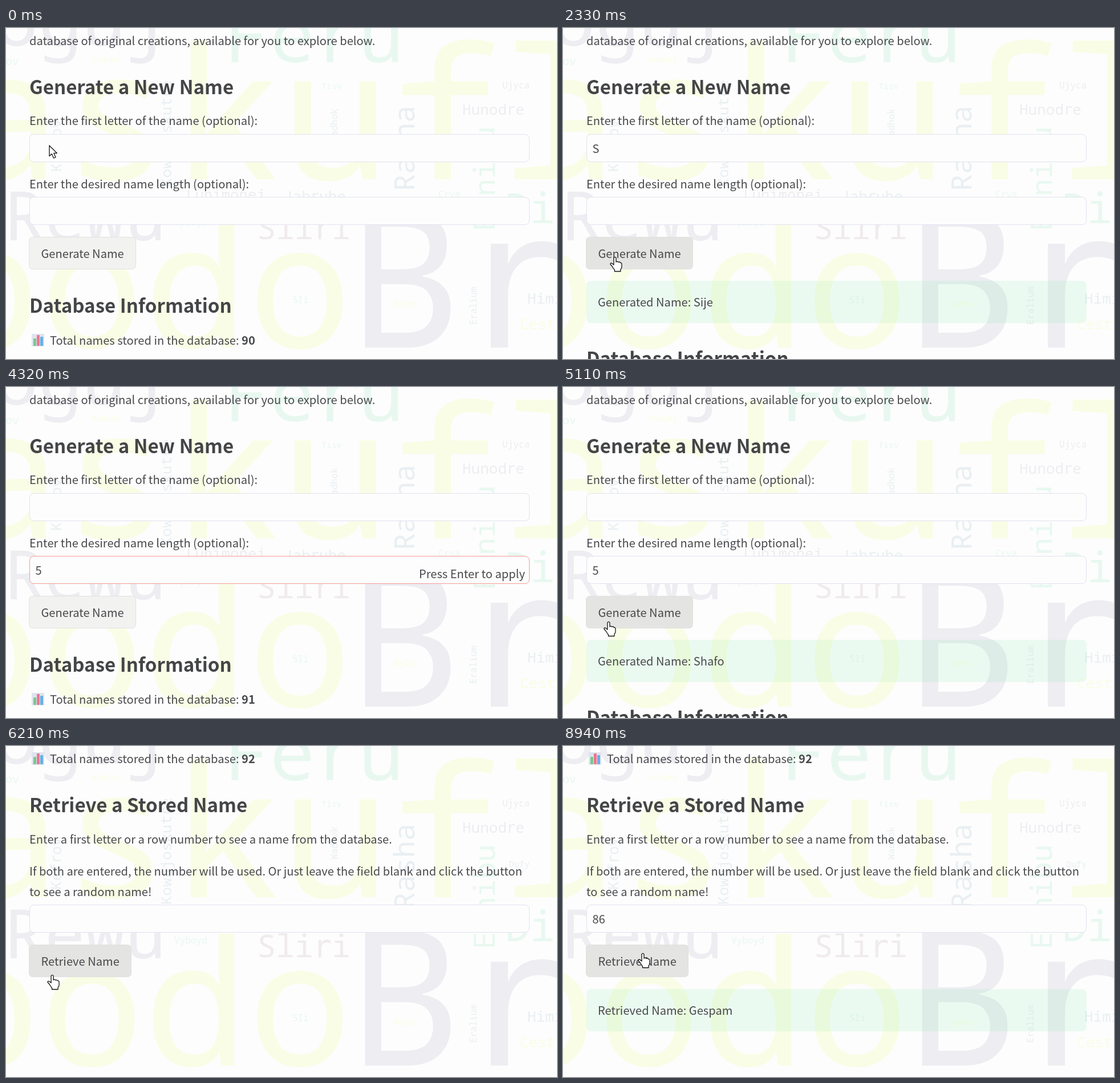
These frames come from a looping animation (966x580 px, 8980 ms). An HTML page:

```html
<!DOCTYPE html>
<html lang="en">
<head>
<meta charset="utf-8">
<title>Name generator</title>
<style>
  html, body { margin: 0; width: 100%; height: 100%; overflow: hidden; background: #fdfdfd; }
  svg { display: block; width: 966px; height: 580px; }
  text { font: 20.12px "Noto Sans CJK JP", "Noto Sans CJK SC", "Noto Sans CJK", "Open Sans", sans-serif; fill: #48494c; white-space: pre; }
  .head { font-size: 33.1px; font-weight: 700; fill: #444547; }
  .bold { font-weight: 700; }
  #cloud text { font-family: "Noto Sans Mono", "DejaVu Sans Mono", monospace; }
  #cloud tspan { font-family: "DejaVu Sans Mono", monospace; }
  .field { fill: #fdfdfd; stroke: #e2e3f0; }
  .field.focus { stroke: #f39c96; }
  .button { fill: #f2f2f0; stroke: #e2e2df; }
  .button.hover { fill: #e4e4e2; stroke: #e1e1df; }
  .success { fill: rgba(50, 215, 120, .085); }
</style>
</head>
<body>
<svg viewBox="0 0 966 580">
  <g id="cloud"></g>
  <g id="upper"></g>
  <g id="lower"></g>
  <g id="cursor" stroke="#111" stroke-width="1.3" stroke-linejoin="round" fill="#fff">
    <path id="arrow" d="M0 0V18.5L4.3 14.6L7.6 22L11 20.5L7.8 13.3H13.3Z"/>
    <path id="hand" d="M-2 1.8Q0 -1 2 1.8V9Q4.500 7 6 9.500Q8.500 8 9.700 10.500Q12 10 12 13V18Q12 20 10 22V25.500H-.5V23Q-3 20 -4.500 17L-8 13Q-8 10 -5 11.500L-2 14Z"/>
  </g>
</svg>
<script>
const LOOP = 8980, BOX = 93;
const $ = id => document.getElementById(id);

function add(parent, tag, attrs, content = '') {
  const el = document.createElementNS('http://www.w3.org/2000/svg', tag);
  for (const k in attrs) el.setAttribute(k, attrs[k]);
  el.textContent = content;
  return parent.appendChild(el);
}
const label = (g, s, y, x = 41, cls = '') => add(g, 'text', { x, y, class: cls }, s);
const heading = (g, s, y) => label(g, s, y, 41, 'head');
const show = (el, on) => el.setAttribute('visibility', on ? 'visible' : 'hidden');
const place = (el, x, y) => el.setAttribute('transform', `translate(${x} ${y})`);

// Word cloud: text, x, baseline, size, colour, upright
const tint = { y: '#f9fde5', g: '#ededf2', m: '#e8f8f0', b: '#e9eff2', p: '#f0ebed' };
const words = [
  ['oguj', -20, 31, 128, 'g'], ['Feru', 383, 60, 132, 'm'],
  ['askufl', -94, 265, 320, 'y'], ['Rewu', -3, 372, 118, 'g'],
  ['bodo', -123, 560, 304, 'y'], ['Br', 598, 560, 333, 'g'],
  ['Sliri', 440, 370, 55, 'p'], ['Dij', 875, 342, 73, 'm'],
  ['Hunodre', 800, 152, 26, 'g'], ['Lunimonej', 316, 301, 25.700, 'g'],
  ['Jabruhe', 487, 304, 26, 'b'], ['Himi', 914, 483, 26, 'b'],
  ['Cest', 901, 528, 26, 'y'], ['ov', -1, 65, 20, 'm'],
  ['Xodumi', 150, 60, 14, 'y'], ['Tisv', 553, 107, 15, 'm'],
  ['Ujyca', 870, 106, 16, 'g'], ['Crva', 758, 297, 16, 'm'],
  ['Dufy', 882, 212, 15, 'b'], ['Vyboyd', 295, 346, 16, 'm'],
  ['SIi', 502, 482, 16, 'm'], ['Hybo', 680, 489, 16, 'y'],
  ['Rasha', 716, 286, 50, 'b', 1], ['Esnibu', 857, 356, 51, 'm', 1],
  ['Kowajoskutre', 290, 278, 26, 'b', 1], ['Kefrov', 97, 252, 25.700, 'b', 1],
  ['Wadhok', 581, 199, 16, 'b', 1], ['Eralium', 825, 520, 16, 'b', 1]
];
for (const [s, x, y, size, c, up] of words) {
  const word = add($('cloud'), 'text', {
    transform: `translate(${x} ${y})` + (up ? ' rotate(-90)' : ''),
    style: `font-size:${size}px;fill:${tint[c]}`
  });
  // The r has no foot, unlike the other letters' font
  for (const part of s.split(/(r)/))
    if (part === 'r') add(word, 'tspan', { dx: '-.02em' }, part);
    else word.append(part);
}

function field(g, y) {
  const rect = add(g, 'rect', { x: 41.5, y: y + .5, width: 876, height: 48, rx: 7.5, class: 'field' });
  const value = label(g, '', y + 32.5, 51.5);
  const hint = label(g, 'Press Enter to apply', y + 39, 910);
  hint.setAttribute('text-anchor', 'end');
  const caret = add(g, 'rect', { y: y + 12, width: 1, height: 25, fill: '#555' });
  return (s, focus, pending, blink) => {
    rect.classList.toggle('focus', focus);
    value.textContent = s;
    show(hint, pending);
    show(caret, focus && blink);
    caret.setAttribute('x', 52 + s.length * 10.4);
  };
}
function button(g, s, y, width) {
  const rect = add(g, 'rect', { x: 40.5, y: y + .5, width, height: 56, rx: 6, class: 'button' });
  label(g, s, y + 37, 61.5);
  return (mx, my, offset) => {
    const over = mx > 41 && mx < 41 + width && my > y + offset && my < y + offset + 57;
    rect.classList.toggle('hover', over);
    return over;
  };
}
function success(g, y) {
  const box = add(g, 'g', {});
  add(box, 'rect', { x: 41, y, width: 877, height: 74, rx: 8, class: 'success' });
  const text = label(box, '', y + 45, 61);
  return s => { text.textContent = s; show(box, s); };
}

const up = $('upper'), low = $('lower');
label(up, 'database of original creations, available for you to explore below.', 30);
heading(up, 'Generate a New Name', 116);
label(up, 'Enter the first letter of the name (optional):', 170);
const letter = field(up, 186);
label(up, 'Enter the desired name length (optional):', 281);
const size = field(up, 296);
const generate = button(up, 'Generate Name', 366, 187);
const generated = success(up, 443);

heading(low, 'Database Information', 499);
for (const [x, y, width, height, fill] of [
  [45, 536, 22, 22, '#dde4ee'], [48, 544, 5, 13, '#79c98f'],
  [54, 538, 5, 19, '#ee7690'], [60, 541, 5, 16, '#6aaee6']
]) add(low, 'rect', { x, y, width, height, fill, rx: 1 });
const total = label(low, 'Total names stored in the database: ', 555, 77);
const count = add(total, 'tspan', { class: 'bold' });
heading(low, 'Retrieve a Stored Name', 641);
label(low, 'Enter a first letter or a row number to see a name from the database.', 696);
label(low, 'If both are entered, the number will be used. Or just leave the field blank and click the button', 752);
label(low, 'to see a random name!', 788);
const row = field(low, 803);
const retrieve = button(low, 'Retrieve Name', 873, 179);
const retrieved = success(low, 951);

// Pointer: time, x, y
const path = [
  [0, 76, 206], [1400, 76, 206], [1900, 91, 401], [2650, 91, 401], [2950, 76, 208],
  [3400, 76, 208], [3700, 76, 318], [4500, 76, 318], [4850, 80, 411], [6150, 80, 411],
  [6480, 92, 300], [7360, 92, 300], [7560, 143, 343], [7800, 140, 363], [LOOP, 140, 363]
];
const typing = [[720, 1400], [3080, 3400], [4020, 4500], [6880, 7360]];
const between = (t, a, b) => t >= a && t < b;
const smooth = u => (u = Math.min(1, Math.max(0, u)), u * u * (3 - 2 * u));

function pointer(t) {
  const i = path.findIndex(p => p[0] > t);
  const [t0, x0, y0] = path[i - 1], [t1, x1, y1] = path[i];
  const k = smooth((t - t0) / (t1 - t0));
  return [x0 + (x1 - x0) * k, y0 + (y1 - y0) * k];
}

function draw(t) {
  const blink = t % 1000 >= 500;
  const first = between(t, 2150, 3250), second = t >= 5080;
  const scroll = Math.round(618 * smooth((t - 5352) / 650));
  const lowY = (first || second ? BOX : 0) - scroll;
  place(up, 0, -scroll);
  place(low, 0, lowY);

  letter(between(t, 720, 3080) ? 'S' : '', between(t, 400, 2020) || between(t, 2970, 3720),
    between(t, 720, 1050) || between(t, 3080, 3250), blink);
  size(t >= 4020 ? '5' : '', between(t, 3720, 4950), between(t, 4020, 4450), blink);
  row(t < 6880 ? '' : t < 7150 ? '8' : '86', between(t, 6500, 8150), between(t, 6880, 8150), blink);
  generated(first ? 'Generated Name: Sije' : second ? 'Generated Name: Shafo' : '');
  retrieved(t >= 8350 ? 'Retrieved Name: Gespam' : '');
  count.textContent = t < 2900 ? 90 : t < 5080 ? 91 : 92;

  const [x, y] = pointer(t);
  const overGenerate = generate(x, y, -scroll), overRetrieve = retrieve(x, y, lowY);
  const visible = !typing.some(([a, b]) => between(t, a, b));
  const hand = overGenerate || overRetrieve;
  place($('cursor'), x, y);
  show($('arrow'), visible && !hand);
  show($('hand'), visible && hand);
}

const start = performance.now();
function frame() {
  draw((performance.now() - start) % LOOP);
  requestAnimationFrame(frame);
}
frame();
</script>
</body>
</html>
```
